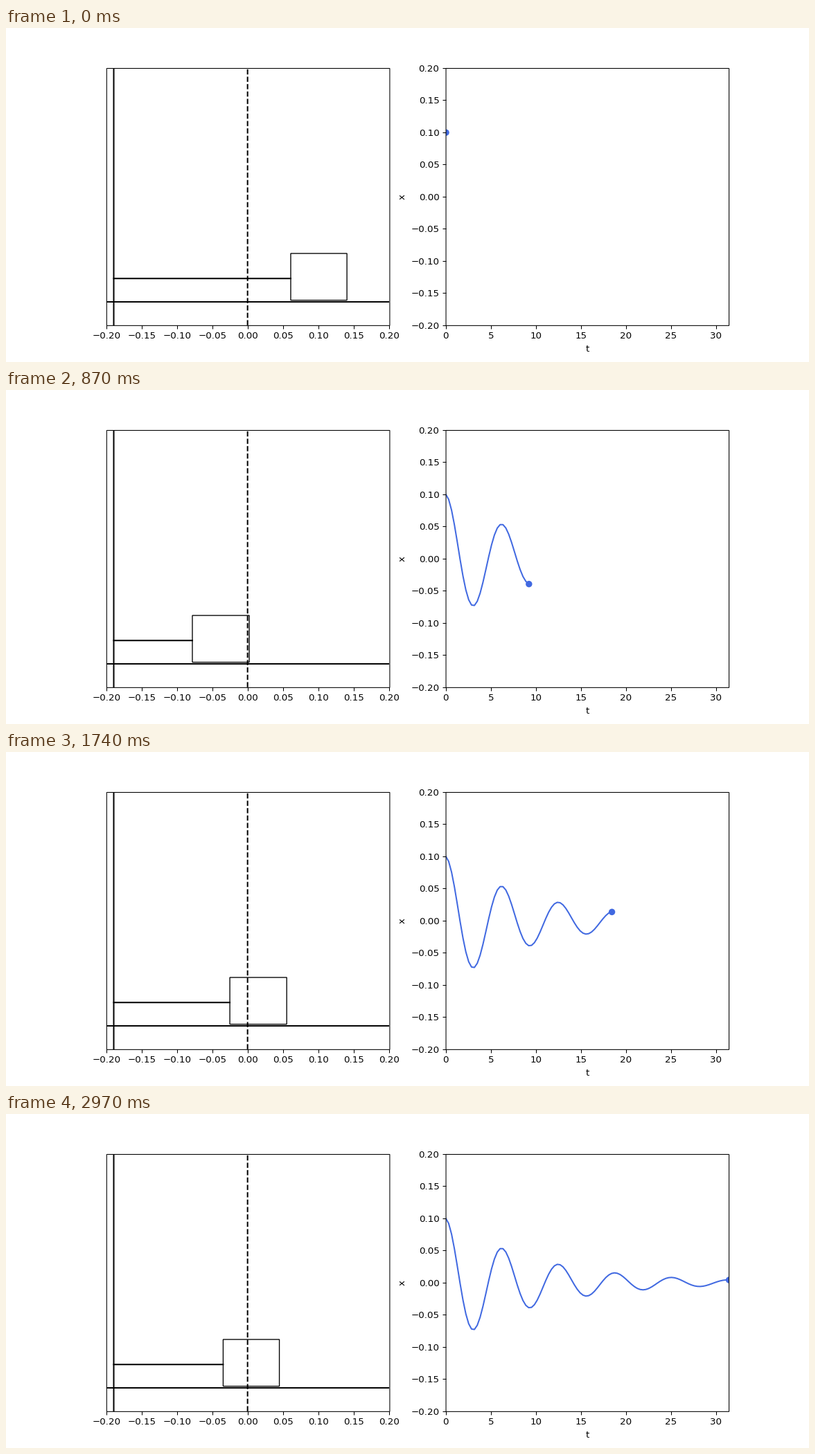
A matplotlib script for the animation above (3000 ms loop, 1159 by 483 pixels).

```python
import numpy as np
import matplotlib.pyplot as plt
from matplotlib.animation import FuncAnimation
from matplotlib.patches import Circle, Rectangle
from matplotlib.transforms import Affine2D

FRAMES = 100
DPI = 96.6
W, H = 1200, 500  # layout grid, scaled down to the stage
LEFT, TOP, BOTTOM = 150, 60, 445
PANEL = 930 / 2.2
GRAPH_LEFT = 1080 - PANEL
WALL, CENTRE, GROUND, SPRING_Y = 161, 361, 410, 375
BOX_TOP, BOX_BOTTOM = 337.5, 407.5

# Damped oscillation of a block on a spring
t = np.linspace(0, 10 * np.pi, FRAMES)
x = 0.1 * np.exp(-0.1 * t) * np.cos(t)

plt.rcParams["font.family"] = "DejaVu Sans"
# The hundredth of a pixel guards against truncation to a smaller canvas
fig, (scene, graph) = plt.subplots(1, 2, figsize=(1159.01 / DPI, 483.01 / DPI), dpi=DPI)
layout = Affine2D().scale(1 / W, -1 / H).translate(0, 1) + fig.transFigure


def grid(value):
    """Centre of the layout pixel nearest to a position."""
    return np.floor(value + 0.5) + 0.5


def scene_x(value):
    return LEFT + (value + 0.2) / 0.4 * PANEL


def outline(ax, left, right, top, bottom, width, **style):
    return ax.add_patch(Rectangle((left, top), right - left, bottom - top, fill=False,
                                  edgecolor="black", linewidth=width, snap=False,
                                  transform=layout, **style))


def rod(xs, ys, style="-"):
    return scene.plot(xs, ys, style, color="black", snap=False, transform=layout)[0]


for ax, left in ((scene, LEFT), (graph, GRAPH_LEFT)):
    ax.spines[:].set_visible(False)
    outline(ax, grid(left), grid(left + PANEL), grid(TOP), grid(BOTTOM), 0.8,
            zorder=2.5, clip_on=False)

scene.set_xlim(-0.2, 0.2)
scene.set_yticks([])
rod([LEFT, LEFT + PANEL], [GROUND, GROUND])
rod([WALL, WALL], [BOTTOM, TOP])
rod([CENTRE, CENTRE], [BOTTOM, TOP], "--")
spring = rod([], [])
box = outline(scene, 0, 1, BOX_TOP, BOX_BOTTOM, 1)

graph.set_xlim(0, t[-1])
graph.set_ylim(-0.2, 0.2)
graph.set_xlabel("t")
graph.set_ylabel("x")
curve, = graph.plot([], [], color="royalblue")
dot = graph.add_patch(Circle((0, 0), 3.5 * 100 / 72, color="royalblue", linewidth=0,
                             zorder=2.2, snap=False, transform=layout))
# Patches multiply their own shape transform with the layout
dot_x = GRAPH_LEFT + t / t[-1] * PANEL
dot_y = TOP + (0.2 - x) / 0.4 * (BOTTOM - TOP)


def update(i):
    left, right = grid(scene_x(x[i] - 0.04)), grid(scene_x(x[i] + 0.04))
    box.set_x(left)
    box.set_width(right - left)
    spring.set_data([WALL, left], [SPRING_Y, SPRING_Y])
    curve.set_data(t[:i + 1], x[:i + 1])
    dot.center = grid(dot_x[i]), grid(dot_y[i])
    return spring, box, curve, dot


anim = FuncAnimation(fig, update, frames=FRAMES, interval=30, repeat=True, repeat_delay=0)
plt.show()
```
